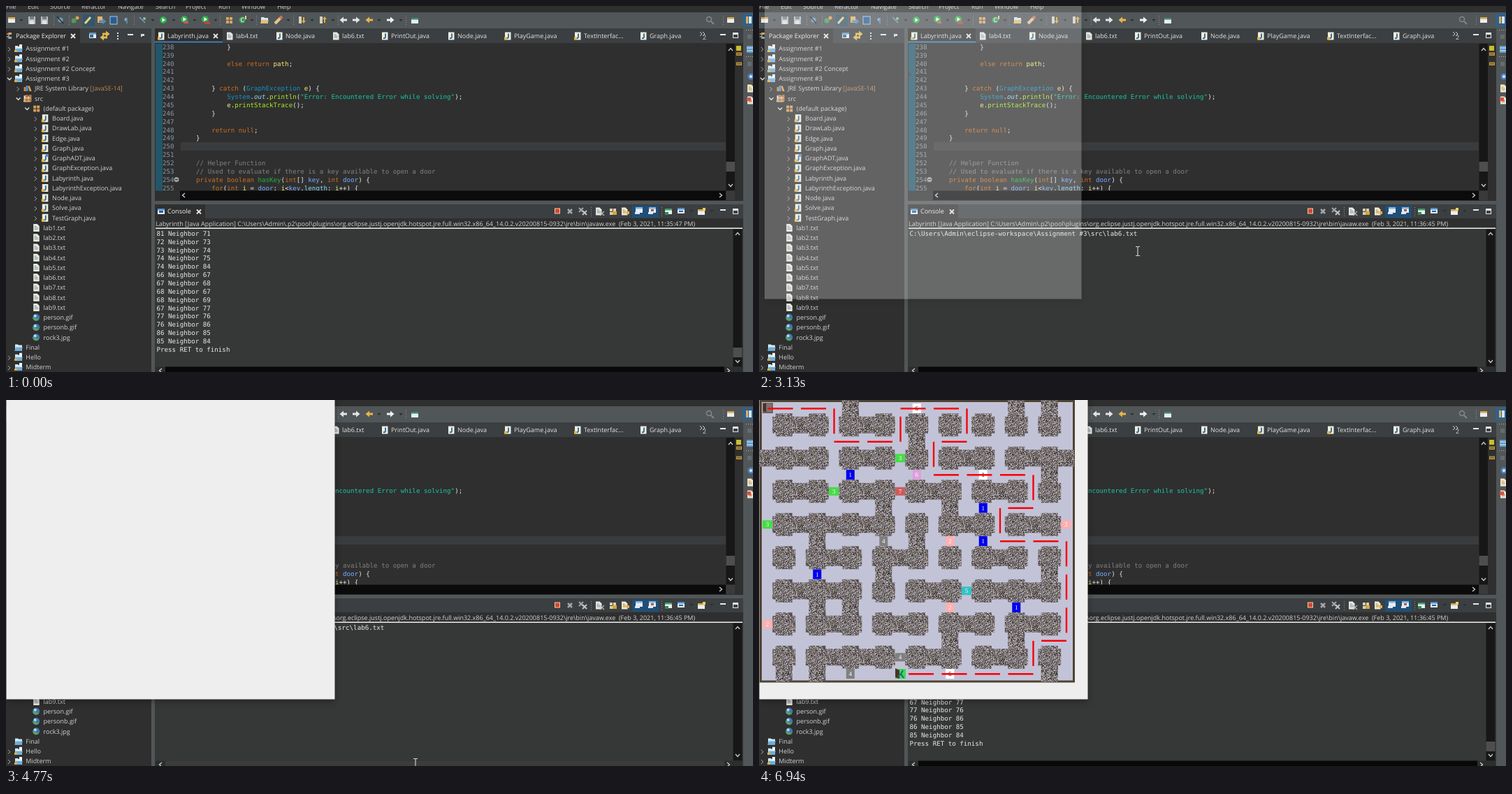
An HTML page for the animation above (7.06 s loop, 1069x524 px).

```html
<!DOCTYPE html>
<html lang="en">
<head>
<meta charset="utf-8">
<title>Labyrinth run</title>
<style>
html, body { margin: 0; width: 100%; height: 100%; overflow: hidden; background: #2f2f2f; }
svg { display: block; position: absolute; left: 0; top: 0; }
text { font: 9px "Open Sans", "Noto Sans", sans-serif; fill: #d2d2d2; white-space: pre; text-rendering: geometricPrecision; }
text.code { font: 9.19px "DejaVu Sans Mono", monospace; fill: #e8e8e8; }
text.num { font: 9px "Liberation Serif", serif; text-anchor: middle; }
</style>
</head>
<body>
<svg id="stage" width="1069" height="524" viewBox="0 0 1069 524"></svg>
<script>
const stage = document.getElementById('stage');
let layer = stage;

function el(tag, attrs = {}, parent = layer) {
  const n = document.createElementNS('http://www.w3.org/2000/svg', tag);
  for (const k in attrs) n.setAttribute(k, attrs[k]);
  return parent.appendChild(n);
}
const rect = (x, y, width, height, fill, more) => el('rect', { x, y, width, height, fill, ...more });
const path = (d, fill, more) => el('path', { d, fill, ...more });
const line = (d, stroke, w = 1) => path(d, 'none', { stroke, 'stroke-width': w });
const dot = (cx, cy, r, fill, more) => el('circle', { cx, cy, r, fill, ...more });
function label(x, y, str, fill, cls) {
  const t = el('text', { x, y });
  t.textContent = str;
  if (fill) t.style.fill = fill;
  if (cls) t.setAttribute('class', cls);
  return t;
}
function group(draw, parent = stage) {
  const old = layer;
  layer = el('g', {}, parent);
  const g = layer;
  draw();
  layer = old;
  return g;
}
const show = (node, on) => { node.style.display = on ? '' : 'none'; };

// icons, placed by their centre
const caret = (x, y = 20) => path(`M${x - 2.5} ${y - 1}h5l-2.5 3z`, '#2a2d2e');
const cross = (x, y, c = '#e6e6e6', w = 1.8) => line(`M${x - 3} ${y - 3}l6 6m0-6l-6 6`, c, w);
const minBox = (x, y) => rect(x - 4, y - 3, 8, 2, '#e8e8e8');
const maxBox = (x, y) => { rect(x - 4, y - 4, 8, 8, '#e8e8e8'); rect(x - 3, y - 1, 6, 4, '#3b3f41'); };
function dots(x, y, c = '#8b9092') {
  for (let i = -2; i < 3; i++) rect(x, y + i * 3, 1, 1, c);
}
function page(x, y, c = '#6f93bd') {
  path(`M${x - 4} ${y - 5.5}h5.5l3 3v8h-8.5z`, '#ece9da');
  line(`M${x - 2.5} ${y - 2}h3m-3 2h5m-5 2h5`, c);
}
function java(x, y, warn) {
  rect(x - 4, y - 5.5, 8.5, 11, '#efeede');
  line(`M${x + 1} ${y - 3.5}v5q0 2-3 1.5`, '#2566a0', 1.8);
  if (warn) rect(x - 5, y + 1.5, 4, 4, '#e9b53c');
}
function folder(x, y, front = '#6aaedb') {
  path(`M${x - 5} ${y - 4}h4l1 1h5v8h-10z`, '#d5e8f2');
  path(`M${x - 6} ${y + 5}l2-5h10l-2 5z`, front);
}
const win = (x, y, c) => {
  rect(x - 5, y - 4, 10, 8, '#e8eef3');
  rect(x - 5, y - 4, 10, 2.5, c);
};
const boxes = (x, y, c) => {
  rect(x - 4, y - 4, 4, 4, c); rect(x + 1, y - 4, 4, 4, c);
  rect(x - 4, y + 1, 4, 4, c); rect(x + 1, y + 1, 4, 4, c);
};
const arrow = (x, y, d, c) =>
  path(`M${x - 5 * d} ${y - 1.5}h${5 * d}v-3l${5.5 * d} 4.5l${-5.5 * d} 4.5v-3h${-5 * d}z`, c);
const play = (x, y, c = '#2fae4a') => {
  dot(x, y, 5, c);
  path(`M${x - 1.5} ${y - 3}l4.5 3l-4.5 3z`, '#fff');
};
const tip = (x, y, way) => line({
  l: `M${x + 2} ${y - 3}l-3.5 3l3.5 3`, r: `M${x - 2} ${y - 3}l3.5 3l-3.5 3`,
  u: `M${x - 3} ${y + 2}l3-3.5l3 3.5`, d: `M${x - 3} ${y - 2}l3 3.5l3-3.5`
}[way], '#c8c8c8', 1.4);

// frame areas
rect(0, 0, 1069, 524, '#515658');
rect(0, 0, 1069, 9, '#2f2f2f');
rect(0, 32, 208, 21, '#3b3f41');
rect(0, 32, 106, 21, '#2f2f2f');
rect(0, 53, 208, 471, '#2f2f2f');
rect(213, 32, 842, 21, '#3b3f41');
rect(213, 32, 97, 21, '#2f2f2f');
rect(213, 50.5, 97, 2, '#3f7fb5');
rect(213, 53, 842, 226, '#2f2f2f');
rect(213, 284, 842, 20, '#3b3f41');
rect(213, 284, 72, 20, '#2f2f2f');
rect(213, 304, 842, 15, '#2f2f2f');
rect(213, 319, 842, 205, '#363838');
rect(214, 317.5, 840, 1.5, '#f0f0f0');

// menu and toolbar
[['File', 0], ['Edit', 31], ['Source', 63], ['Refactor', 108], ['Navigate', 160], ['Search', 214],
 ['Project', 257], ['Run', 304], ['Window', 337], ['Help', 388]].forEach(([s, x]) => label(x, 4, s));
[68, 90, 183, 306, 358, 411, 475, 572, 1026].forEach(x => dots(x, 20));
[22, 210, 240, 270, 300, 352, 404, 438, 468, 534, 565].forEach(x => caret(x));
win(8, 20, '#d9a441');
for (const x of [37, 55]) { rect(x - 5, 15, 10, 11, '#b9bdbf'); rect(x - 3, 15, 6, 4, '#777d80'); rect(x - 3, 21, 6, 5, '#e2e2e2'); }
dot(78, 20, 3.5, '#6d9dc0'); line('M73 15l9 10', '#20282c', 1.2);
dot(97, 21, 3.5, '#4f9a58'); dot(102, 17, 2.5, '#d8a352');
rect(110, 12, 17, 17, '#33566b'); line('M113 25l8-9', '#f0d27c', 3);
rect(131, 15, 7, 9, '#e1b468'); arrow(138, 22, 1, '#4f8bc0');
rect(149, 15, 10, 11, '#2b5c8f', { stroke: '#a5c7e6' });
label(169, 24, '¶', '#7cb2e6');
line('M191 16l8 8', '#6aa0c9', 1.6); dot(198, 18, 2, '#8cc48f');
const hover = rect(216, 11, 18, 18, '#70808a', { stroke: '#8fa3ae' });
play(225, 20);
play(255, 19); rect(255, 22, 6, 3, '#d4574d');
play(285, 19); rect(284, 22, 8, 4, '#b8463d');
boxes(319, 20, '#d8a765');
dot(338, 20, 4.5, '#40a05a'); label(335.5, 23, 'C', '#fff'); rect(342, 14, 2, 5, '#f0d27c');
folder(370, 20, '#e3c070');
line('M385 25l8-8', '#e7c48f', 4); line('M392 18l3-3', '#d5734f', 4);
for (const [x, y] of [[424, 1], [454, -1]]) {
  rect(x - 5, 15, 4, 10, '#d4d0c0');
  path(`M${x + 2} ${20 + 5 * y}l-3 ${-4 * y}h2v${-5 * y}h2v${5 * y}h2z`, '#e0ac45');
}
arrow(483, 20, -1, '#e4e4e4'); arrow(501, 20, 1, '#e4e4e4');
arrow(520, 20, -1, '#e9b54a'); arrow(550, 20, 1, '#f0f0f0');
win(585, 21, '#3b8f5f');
dot(1006, 19, 3.5, 'none', { stroke: '#85898b', 'stroke-width': 1.5 }); line('M1009 22l4 4', '#85898b', 2);
win(1037, 20, '#d9a441');
rect(1054, 11, 15, 18, '#2f618d'); rect(1059, 15, 3, 10, '#e0b060'); rect(1063, 15, 4, 10, '#d7e4ee');

// right strip
for (const y of [34, 72]) for (let i = 0; i < 4; i++) rect(1059 + i * 3, y, 1, 1, '#a9adaf');
rect(1060, 57, 9, 10, '#5f9ccb'); line('M1060 60h9m-9 4h9', '#e4eef5');
rect(1061, 41, 6, 6, '#666b6d'); rect(1061, 80, 6, 6, '#666b6d');
dot(1066, 101, 4.5, '#4d86c2'); dot(1066, 101, 2, '#d9e8f6');
page(1065, 118, '#c99a45'); page(1065, 135, '#c14b3c'); rect(1060, 131, 6, 5, '#d4553f');

// package explorer
line('M1 40h3m-3 4h3M4 38v9', '#b8a070', 1.4); rect(4, 38, 4, 3, '#d9a765'); rect(4, 44, 4, 3, '#7ab0d6');
label(14, 46, 'Package Explorer', '#f0f0f0'); cross(96, 43);
win(124, 42, '#5b94c4'); rect(120, 41, 5, 4, '#31688f');
arrow(143, 40, 1, '#e5b84d'); arrow(140, 45, -1, '#e5b84d');
for (const y of [39, 43, 47]) rect(159, y - 1, 2, 2, '#e0e0e0');
minBox(178, 43); rect(193, 40, 5, 4, '#d8d8d8'); rect(195, 43, 3, 2, '#2f2f2f');

const project = (x, y) => { folder(x, y); rect(x + 1, y - 6, 4, 5, '#f2f4f5'); rect(x - 6, y + 2, 4, 3, '#e7b03c'); };
const image = (x, y) => { dot(x, y, 5, '#3f78ad'); path(`M${x - 5} ${y}a5 5 0 0 0 9 3q-5-3-9-3z`, '#5aa062'); dot(x - 1.5, y - 2, 2, '#b9d9ef'); };
const lib = (x, y) => { rect(x - 5, y - 2, 3, 6, '#c98c42'); rect(x - 2, y - 4, 3, 8, '#5b8fbd'); path(`M${x + 1} ${y - 3}l2-1l3 8h-3z`, '#d7a35c'); };
const src = (x, y) => { folder(x, y, '#e0b878'); boxes(x + 1, y - 1, '#b9773a'); };
const pack = (x, y) => boxes(x, y, '#d39f58');
const file = (x, y) => java(x, y, true);
const classes = 'Board DrawLab Edge Graph GraphADT GraphException Labyrinth LabyrinthException Node Solve TestGraph'.split(' ');
// label, depth, icon, state: > closed, v open, blank leaf
const tree = [
  ['Assignment #1', 0, project, '>'], ['Assignment #2', 0, project, '>'],
  ['Assignment #2 Concept', 0, project, '>'], ['Assignment #3', 0, project, 'v'],
  ['JRE System Library', 1, lib, '>'], ['src', 1, src, 'v'], ['(default package)', 2, pack, 'v'],
  ...classes.map(s => [s + '.java', 3, file, '>']),
  ...Array.from({ length: 9 }, (_, i) => [`lab${i + 1}.txt`, 2, page, '']),
  ['person.gif', 2, image, ''], ['personb.gif', 2, image, ''], ['rock3.jpg', 2, image, ''],
  ['Final', 0, folder, ''], ['Hello', 0, project, '>'], ['Midterm', 0, project, '>']
];
tree.forEach(([s, depth, icon, state], i) => {
  const y = 61 + 14.25 * i, x = 18 + 12.6 * depth;
  if (state === '>') line(`M${x - 15} ${y - 2}l3 3l-3 3`, '#a8a8a8');
  if (state === 'v') line(`M${x - 16} ${y - 1}l3 3l3-3`, '#e0e0e0', 1.3);
  icon(x, y);
  label(x + 10.3, y + 3.3, s);
  if (s === 'GraphADT.java') rect(x + 1, y - 6, 4, 4, '#4f8bc9');
});
label(120, 121.3, '[JavaSE-14]', '#bd8a57');

// editor tabs
[['Labyrinth.java', 231, 1], ['lab4.txt', 329], ['Node.java', 400, 0], ['lab6.txt', 481], ['PrintOut.java', 551, 0],
 ['Node.java', 646, 0], ['PlayGame.java', 727, 1], ['TextInterfac...', 827, 1], ['Graph.java', 921, 0]].forEach(([s, x, w]) => {
  s.endsWith('txt') ? page(x - 9, 43) : java(x - 9, 43, w);
  label(x, 46, s, '#e2e2e2');
});
cross(300, 43);
line('M993 37l3 3l-3 3m4-6l3 3l-3 3', '#d8d8d8'); label(997, 48, '2');
minBox(1026, 43); maxBox(1044, 42);

// editor
rect(214, 54, 10, 211, '#22566a');
rect(250, 195, 780, 12, '#3a3b3c');
const colors = { o: '#cc6c1d', v: '#f3ec79', c: '#1290c3', s: '#17c6a3', m: '#a7ec21', f: '#8ddaf8',
  d: '#1eb540', p: '#79abff', g: '#808080' };
const code = [
  '            }', '', '            ~oelse return~ ~vpath~;', '', '',
  '        } ~ocatch~ (~cGraphException~ ~ve~) {',
  '            ~cSystem~.~fout~.~mprintln~(~s"Error: Encountered Error while solving"~);',
  '            ~ve~.~mprintStackTrace~();', '        }', '', '        ~oreturn null~;', '    }', '', '',
  '    ~g// Helper Function', '    ~g// Used to evaluate if there is a key available to open a door',
  '    ~oprivate boolean~ ~dhasKey~(~oint~[] ~pkey~, ~oint~ ~pdoor~) {',
  '        ~ofor~(~oint~ ~vi~ = ~pdoor~; ~vi~<~pkey~.~flength~; ~vi~++) {'
];
code.forEach((text, i) => {
  const y = 61.8 + 11.88 * i;
  label(224, y, 238 + i, '#8799a3', 'code');
  const t = label(250, y, '', '', 'code');
  text.split('~').forEach((part, k) => {
    const span = el('tspan', {}, t);
    span.textContent = k % 2 ? part.slice(1) : part;
    if (k % 2) span.style.fill = colors[part[0]];
    if (part === 'fout') span.style.fontStyle = 'italic';
  });
});
dot(244, 248.5, 3.5, '#9aa3a8'); line('M242 248.5h4', '#2f2f2f');
const marker = path('M214 94l5 4l-5 4z', '#3a3f46');
rect(213, 264.5, 842, 14.5, '#2f2f2f');
rect(249, 264.5, 781, 13.5, '#0b0b0b'); tip(254, 271, 'l'); tip(1023, 271, 'r');
rect(1030.5, 54, 12.5, 210.5, '#171717'); rect(1030.5, 223, 12.5, 14, '#4e4e4e');
rect(1030.5, 264.5, 12.5, 13.5, '#3a3a3a');
tip(1037, 62, 'u'); tip(1037, 257, 'd');
rect(1045, 57, 7, 7, '#cbbf2a');
for (const y of [67, 81]) rect(1045.5, y, 7, 3.5, '#8a6a25', { stroke: '#c39a45' });

// console
win(222, 294, '#4c8fcf'); rect(219, 293, 6, 3, '#2c5f94');
label(231, 297.3, 'Console', '#f0f0f0'); cross(276, 294.5);
rect(785.5, 290, 7, 7, '#d8452f', { stroke: '#f0cfa8' });
cross(807, 294, '#a4a7a8', 2.5); cross(823, 292, '#a4a7a8', 2); cross(828, 296, '#c2c4c5', 2);
[837, 938].forEach(x => dots(x, 294));
page(848, 294); cross(853, 297, '#b9b9b9', 1.2);
boxes(868, 294, '#d9cfae'); rect(868, 294, 6, 5, '#dba23c');
page(885, 294, '#c48a35'); rect(888, 294, 4, 4, '#e0b04c');
rect(896, 286, 38, 17, '#1f4f78');
for (const x of [905, 924]) { win(x + 1, 292, '#7fb5e3'); rect(x - 5, 295, 7, 3, '#dce8f2'); }
rect(923, 291, 4, 3, '#c7503d');
win(948, 294, '#3f9c63'); rect(943, 295, 5, 4, '#2e8b57');
win(966, 293, '#4c8fcf'); rect(963, 293, 6, 2, '#2c5f94'); caret(981, 293);
win(995, 295, '#d9a441'); rect(997, 289, 4, 4, '#f0d060'); caret(1010, 293);
minBox(1026, 294); maxBox(1044, 294);

const user = 'Admin';
const title = label(214, 315, '');
const titleAt = clock => `Labyrinth [Java Application] C:\\Users\\${user}\\.p2\\pool\\plugins\\org.eclipse.justj.openjdk.hotspot.jre.full.win32.x86_64_14.0.2.v20200815-0932\\jre\\bin\\javaw.exe  (Feb 3, 2021, ${clock} PM)`;
rect(1040.5, 319.5, 13, 197, '#171717');
tip(1047, 326, 'u'); tip(1047, 509, 'd');
rect(214, 516.5, 840, 7.5, '#2c2d2d');
const track = rect(228, 516.5, 800, 7.5, '#080808');
tip(221, 522, 'l'); tip(1034, 522, 'r');
const pairs = '81 71,72 73,73 74,74 75,74 84,66 67,67 68,68 67,68 69,67 77,77 76,76 86,86 85,85 84';
const output = group(() => {
  [...pairs.split(',').map(p => p.replace(' ', ' Neighbor ')), 'Press RET to finish']
    .forEach((s, i) => label(215.5, 328.8 + 11.86 * i, s, '', 'code'));
  rect(1040.5, 489, 13, 14, '#4e4e4e');
});
const input = label(215.5, 328.8, `C:\\Users\\${user}\\eclipse-workspace\\Assignment #3\\src\\lab6.txt`, '', 'code');

// maze window
const U = 23.75, at = i => 12 + U * i;
let seed = 7;
const rnd = () => (seed = (seed * 16807) % 2147483647) / 2147483647;
const stone = el('pattern', { id: 'stone', width: 48, height: 48, patternUnits: 'userSpaceOnUse' }, el('defs'));
const tones = ['#3b3738', '#6d6866', '#8f8791', '#b9b4bd', '#746a5b'], specks = tones.map(() => '');
for (let i = 0; i < 48 * 48; i++) specks[Math.floor(rnd() * 5)] += `M${i % 48} ${Math.floor(i / 48)}h1v1h-1z`;
specks.forEach((d, i) => el('path', { d, fill: tones[i], 'shape-rendering': 'crispEdges' }, stone));

const pane = rect(0, -20, 0, 0, '#eee');
pane.style.filter = 'drop-shadow(0 3px 5px rgba(0,0,0,.35))';
const board = group(() => {
  rect(1, 0, 451, 404.5, '#4e4433');
  rect(4, 3, 445, 398.5, '#c3c3d8');
});

// one mark per wall: below each room, then between neighbouring rooms
const below = ['.#.#......', '##.#..#.##', '.#.#.#.#..', '.###..#.#.', '..#.#..#..', '.##..#.##.', '..#.#.#.#.', '..##.#.#..'];
const beside = ['..#....##', '....#....', '........#', '...#.#...', '.#..#....', '...#....#', '.##......', '.....#.#.', '##......#'];
const fills = { 1: '#0000ee', 2: '#ffafaf', 3: '#46dc46', 4: '#808080', 5: '#30c4c4', 6: '#dda0dd', 7: '#cd5c5c' };
// column, row, number; a trailing w marks white
const tiles = '9 0 6w,8 3 3,5 4 1,9 4 6,13 4 1w,4 5 3,8 5 7,13 6 1,0 7 3,18 7 2,7 8 4,11 8 2,13 8 1,3 10 1,12 11 5,11 12 2,15 12 1,0 13 2,8 15 4,5 16 4,11 16 6w';
const clip = el('rect', { x: 0, y: 0, width: 460, height: 0 }, el('clipPath', { id: 'drawn' }));
const wall = (x, y, w, h) => rect(x - w / 2, y - h / 2, w, h, 'url(#stone)');
const maze = group(() => {
  for (let r = 1; r < 16; r += 2) for (let c = 1; c < 18; c += 2) {
    wall(at(c), at(r), 33, 24);
    wall(at(c), at(r), 24, 33);
  }
  below.forEach((row, j) => [...row].forEach((m, i) => m === '#' && wall(at(2 * i), at(2 * j + 1), 23, 24)));
  beside.forEach((row, j) => [...row].forEach((m, i) => m === '#' && wall(at(2 * i + 1), at(2 * j), 24, 23)));
  tiles.split(',').forEach(s => {
    const [c, r, n] = s.split(' '), white = n.endsWith('w');
    const [w, h] = c % 2 ? [12, 14] : [14, 12];
    rect(at(+c) - w / 2, at(+r) - h / 2, w, h, white ? '#fff' : fills[n]);
    label(at(+c), at(+r) + 3, n[0], white ? '#000' : '#fff', 'num');
  });
  rect(5, 4, 15, 15, '#6d625d'); path('M6 6l4-2v14l-4-3z', '#4b2f2d'); rect(11, 5, 7, 12, '#81716d');
  rect(195, 385, 15, 14, '#3fd75a'); path('M195 384l6 3v12l-6-2z', '#4a332a');
  line('M206 387l-3 5l4 6m-4-6l-4 4', '#1d6f6c', 2);
});
maze.setAttribute('clip-path', 'url(#drawn)');

const steps = { R: [1, 0], L: [-1, 0], U: [0, -1], D: [0, 1] };
const trail = group(() => {
  let x = 12.5, y = 12.3;
  for (const s of 'RRDRRURRDLDRRRDLDRRDDDLDLLLL') {
    const [dx, dy] = steps[s];
    line(`M${x} ${y}l${36 * dx} ${36 * dy}`, '#f80008', 2.4);
    x += 2 * U * dx;
    y += 2 * U * dy;
  }
});

// pointers
const pointer = group(() => path('M0 0v14.5l3.4-3.2l2.4 5.4l2.3-1l-2.4-5.2h4.6z', '#fff', { stroke: '#111', 'stroke-width': 0.8 }));
const ring = group(() => dot(10.5, 0.5, 4.8, 'none', { stroke: '#1c86d8', 'stroke-width': 2.6 }), pointer);
const beam = group(() => line('M-3 -6.5h2.2l.8 .8l.8-.8h2.2M0-6v12M-3 6.5h2.2l.8-.8l.8 .8h2.2', '#d5d5d5', 1.1));

const LOOP = 7060;
// first time, last time, number of picture changes
const bursts = [[100, 310, 3], [500, 1170, 7], [1270, 1940, 7], [2040, 2700, 7], [2820, 3460, 7],
  [3550, 3670, 2], [4430, 4870, 5], [5090, 5750, 7], [6830, 6940, 2]];
const ticks = bursts.flatMap(([a, b, n]) => Array.from({ length: n }, (_, k) => a + (b - a) * k / (n - 1)));
const route = [[100, 698, 424], [205, 478, 270], [310, 263, 121], [500, 255, 100], [720, 190, 34], [840, 172, 18],
  [950, 190, 10], [1170, 228, 21], [1500, 228, 21], [1940, 397, 188], [2480, 452, 291], [3140, 542, 351],
  [3353, 566, 370], [3460, 569, 371], [3670, 594, 379], [4430, 592, 400], [4760, 586, 520], [4870, 586, 540]];
// from time, left, right, bottom, opacity
const opening = [[3100, 8, 461.5, 419.5, 0.27], [3200, 2, 469, 427, 0.82], [3300, 0.5, 470.5, 428.5, 1]];

function spot(t) {
  const i = route.findIndex(p => p[0] > t);
  if (i < 0) return [0, 600];
  if (i === 0) return route[0].slice(1);
  const [t0, x0, y0] = route[i - 1], [t1, x1, y1] = route[i], k = (t - t0) / (t1 - t0);
  return [x0 + (x1 - x0) * k, y0 + (y1 - y0) * k];
}

let last = -1;
function draw(time) {
  const t = ticks.filter(s => s <= time + 15).pop() || 0;
  if (t === last) return;
  last = t;

  const [x, y] = spot(t), arrowOn = t > 560 && t < 2810;
  const seen = t >= 100 && t < 4860;
  show(pointer, seen && arrowOn);
  show(ring, t > 2030);
  show(beam, seen && !arrowOn);
  for (const p of [pointer, beam]) p.setAttribute('transform', `translate(${x} ${y})`);

  show(hover, t > 1050 && t < 1550);
  show(marker, t > 1260);
  track.setAttribute('fill', t > 4700 && t < 4800 ? '#3c3c3c' : '#080808');

  title.textContent = titleAt(t < 2140 ? '11:35:47' : '11:36:45');
  show(output, t < 2140 || t > 6800);
  show(input, t > 2690 && t < 6800);

  const o = opening.filter(s => s[0] <= t).pop();
  show(pane, o);
  if (o) {
    pane.setAttribute('x', o[1]);
    pane.setAttribute('width', o[2] - o[1]);
    pane.setAttribute('height', o[3] + 20);
    pane.setAttribute('opacity', o[4]);
  }
  show(board, t >= 5090);
  show(maze, t >= 5090);
  clip.setAttribute('height', Math.max(0, Math.min(1, (t - 5090) / 660)) * 404);
  const count = t < 6820 ? 0 : t < 6900 ? 14 : 28;
  [...trail.children].forEach((s, i) => show(s, i < count));
}

const start = performance.now();
function tick() {
  draw((performance.now() - start) % LOOP);
  requestAnimationFrame(tick);
}
tick();
</script>
</body>
</html>
```
